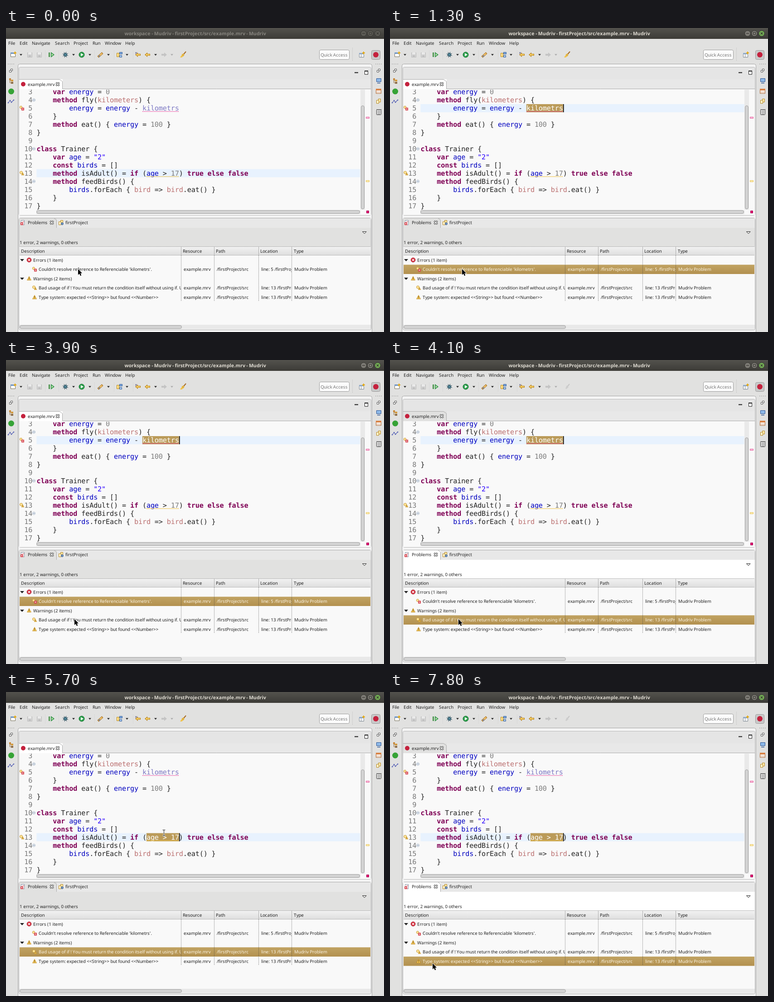
These frames come from a looping animation (834x671 px, 8 s). An HTML page with a canvas:

```html
<!DOCTYPE html>
<html lang="en">
<head>
<meta charset="utf-8">
<title>Code editor</title>
<style>
html, body { margin: 0; width: 100%; height: 100%; overflow: hidden; background: #e1e1e0; }
canvas { display: block; }
</style>
</head>
<body>
<canvas id="stage" width="834" height="671"></canvas>
<script>
const ctx = document.getElementById('stage').getContext('2d');
const LOOP = 8000, STEP = 100;
// Text is set on a whole-pixel desktop grid, shown at this scale
const SCALE = .8165, CHAR = 11 * SCALE, CODE_X = 67.4;
const UI = '12px "Noto Sans", sans-serif';
const TITLE = 'bold 13px "Noto Sans", sans-serif';
const MONO = '18.6px "DejaVu Sans Mono", monospace';
const GOLD = '#bb9b59', INK = '#222', PANEL = '#e1e1e0';
const APP = 'Mudriv', FILE = 'example.mrv';

const code = [
  '    var energy = 0',
  '    method fly(kilometers) {',
  '        energy = energy - kilometrs',
  '    }',
  '    method eat() { energy = 100 }',
  '}',
  '',
  'class Trainer {',
  '    var age = "2"',
  '    const birds = []',
  '    method isAdult() = if (age > 17) true else false',
  '    method feedBirds() {',
  '        birds.forEach { bird => bird.eat() }',
  '    }',
  '}'
];
const syntax = [
  [/^(var|const|method|class|if|true|else|false)$/, '#7f0055', true],
  [/^(energy|age|birds)$/, '#0000c0'],
  [/^(kilometers|bird)$/, '#bb7070'],
  [/^kilometrs$/, '#7d79c4'],
  [/^\d+$/, '#7d7d7d'],
  [/^"/, '#2a00ff']
];
const problems = [
  { y: 532.5, icon: 'error', text: "Couldn't resolve reference to Referenciable 'kilometrs'.", line: 5 },
  { y: 573.5, icon: 'quick', text: 'Bad usage of if ! You must return the condition itself without using if. Use it', line: 13 },
  { y: 594, icon: 'warning', text: 'Type system: expected <<String>> but found <<Number>>', line: 13 }
];
// Pointer path: time, x, y
const path = [
  [0, 159, 532], [1400, 159, 532], [1700, 318, 218], [1800, 318, 218], [2200, 350, 175],
  [2300, 350, 175], [2400, 318, 235.5], [3300, 318, 235.5], [3500, 151, 572], [4300, 151, 572],
  [4400, 153, 570], [4600, 352, 316], [4800, 352, 316], [5000, 318, 306], [5200, 390, 314],
  [5400, 308, 325], [5700, 348.5, 311], [6000, 384, 320], [6200, 310, 322], [6400, 346, 318],
  [6600, 346, 318], [6900, 80, 566], [7100, 80, 566], [7400, 94, 599], [8000, 94, 599]
];

function box(x, y, w, h, fill, stroke, r = 0) {
  const o = stroke ? .5 : 0;
  ctx.beginPath();
  ctx.roundRect(x + o, y + o, w - 2 * o, h - 2 * o, r);
  ctx.lineWidth = 1;
  if (fill) { ctx.fillStyle = fill; ctx.fill(); }
  if (stroke) { ctx.strokeStyle = stroke; ctx.stroke(); }
}
function trace(pts) {
  ctx.beginPath();
  for (let i = 0; i < pts.length; i += 2) ctx.lineTo(pts[i], pts[i + 1]);
}
function line(color, width, ...pts) {
  trace(pts);
  ctx.strokeStyle = color;
  ctx.lineWidth = width;
  ctx.stroke();
}
function poly(fill, ...pts) {
  trace(pts);
  ctx.fillStyle = fill;
  ctx.fill();
}
function disc(x, y, r, fill, stroke) {
  ctx.beginPath();
  ctx.arc(x, y, r, 0, 7);
  ctx.lineWidth = 1;
  if (fill) { ctx.fillStyle = fill; ctx.fill(); }
  if (stroke) { ctx.strokeStyle = stroke; ctx.stroke(); }
}
function dashed(color, width, dash, ...pts) {
  ctx.setLineDash(dash);
  line(color, width, ...pts);
  ctx.setLineDash([]);
}
function fade(y0, y1, top, bottom) {
  const g = ctx.createLinearGradient(0, y0, 0, y1);
  g.addColorStop(0, top);
  g.addColorStop(1, bottom);
  return g;
}

const advances = {};
function advance(char, font) {
  return advances[font + char] ??= Math.round(ctx.measureText(char).width);
}
// align: 0 = left, .5 = centre, 1 = right
function label(text, x, y, { color = INK, right = 834, font = UI, align = 0 } = {}) {
  const chars = [...String(text)];
  ctx.save();
  ctx.beginPath();
  ctx.rect(0, 0, right, 671);
  ctx.clip();
  ctx.translate(x, y + 3.5);
  ctx.scale(SCALE, SCALE);
  ctx.font = font;
  ctx.fillStyle = color;
  let pen = -align * chars.reduce((sum, c) => sum + advance(c, font), 0);
  for (const c of chars) {
    ctx.fillText(c, pen, 0);
    pen += advance(c, font);
  }
  ctx.restore();
}
function cross(x, y, r, color, width = 1.2) {
  line(color, width, x - r, y - r, x + r, y + r);
  line(color, width, x + r, y - r, x - r, y + r);
}
function tabClose(x, y) {
  cross(x, y, 3.4, '#444', 3.6);
  cross(x, y, 3, '#fff', 1.5);
}
const dropDown = (x, y, color = INK) => poly(color, x - 3, y - 1.5, x + 3, y - 1.5, x, y + 2);
const arrow = (x, y, d, fill) => poly(fill, x - 6 * d, y, x, y - 5, x, y - 2, x + 6 * d, y - 2, x + 6 * d, y + 2, x, y + 2, x, y + 5);

const icons = {
  warning(x, y) {
    poly('#c08a1c', x, y - 5, x + 5, y + 4.5, x - 5, y + 4.5);
    poly('#ffd667', x, y - 3, x + 3.6, y + 3.5, x - 3.6, y + 3.5);
    line('#553300', 1.2, x, y - 1.5, x, y + 1.2);
    line('#553300', 1.2, x, y + 2, x, y + 3);
  },
  quick(x, y) {
    disc(x - 1.5, y - 1.5, 3, '#ffe699', '#c79a3c');
    ctx.save();
    ctx.translate(x + 2, y + 1.5);
    ctx.scale(.65, .65);
    icons.warning(0, 0);
    ctx.restore();
  },
  error(x, y) {
    disc(x - 2, y - 2, 2.7, '#ffe699', '#c79a3c');
    box(x - 1, y - 1, 6, 6, '#d43a45');
    cross(x + 2, y + 2, 1.6, '#fff', 1);
  },
  restore(x, y) {
    box(x - 1, y - 4, 5, 5, '#fff', '#555');
    box(x - 4, y - 1, 5, 5, '#fff', '#555');
  },
  docs(x, y) {
    box(x - 1, y - 5, 6, 8, '#ffe9a8', '#b68b2d');
    box(x - 5, y - 2, 6, 8, '#fff3c9', '#b68b2d');
  }
};

function drawTitle(active) {
  box(0, 0, 834, 24, fade(0, 24, '#53524d', '#3c3b37'));
  const color = active ? '#dfdbd2' : '#87857f';
  label(`workspace - ${APP} - firstProject/src/${FILE} - ${APP}`, 417.5, 12, { color, font: TITLE, align: .5 });
  [789, 804, 820].forEach((x, i) => {
    disc(x, 12, 6.3, active ? (i == 2 ? '#74ad56' : '#7d7b75') : '#5c5b55', '#32312d');
    const ink = active ? '#2f2e2a' : '#35342f';
    if (i == 0) line(ink, 1.2, x - 3, 12, x + 3, 12);
    if (i == 1) box(x - 3, 9, 6, 6, null, ink);
    if (i == 2) cross(x, 12, 2.4, ink);
  });
}

function drawToolbar(broomEnabled) {
  'File,5 Edit,30 Navigate,57 Search,108 Project,149 Run,191 Window,218 Help,263'.split(' ').forEach(m => {
    const [name, x] = m.split(',');
    label(name, +x, 33);
  });
  const y = 59;
  box(10, 54, 11, 10, '#fff', '#77725c');
  box(10, 54, 11, 3, '#6d94c5');
  line('#e2a814', 2, 17, 55, 23, 55);
  line('#e2a814', 2, 20, 52, 20, 58);
  for (const x of [52, 73]) {
    box(x - 5, y - 5, 11, 11, '#d6d6d6', '#bdbdbd');
    box(x - 3, y - 5, 7, 4, '#eaeaea');
    box(x - 2, y + 1, 5, 5, '#c2c2c2');
  }
  for (const x of [86, 116, 195, 238, 280]) dashed('#c5c5c5', 1, [1, 2], x + .5, 50, x + .5, 69);
  box(94, 54, 3, 10, '#86bb78', '#33843d');
  poly('#329447', 99, 53, 107, 59, 99, 65);
  poly('#b9e2ac', 100.5, 56, 104.5, 59, 100.5, 62);
  for (let a = 0; a < 8; a++)
    line('#2e5060', 1, 131, y, 131 + 6.5 * Math.cos(a * .785 + .3), y + 6.5 * Math.sin(a * .785 + .3));
  disc(131, y, 3.6, '#4f8295', '#254450');
  disc(167, y, 6, '#2c9f4b', '#167031');
  poly('#fff', 165, 55.5, 171, 59, 165, 62.5);
  line('#ae7623', 4.5, 203, 64, 213, 55);
  line('#f4c773', 2.5, 204, 63, 212, 56);
  disc(206, 62, 2, '#7b8296');
  box(244, 55, 6, 9, '#ffe088', '#b78b25');
  box(250, 53, 7, 5, '#7da4d8', '#3c68a2');
  box(250, 60, 6, 5, '#a9c5e8', '#3c68a2');
  for (const x of [291, 312]) {
    arrow(x, y, 1, '#b47c13');
    poly('#ffda70', x - 4, y, x - 1, y - 3, x - 1, y - 1, x + 5, y - 1, x + 5, y + 1, x - 1, y + 1, x - 1, y + 3);
  }
  cross(287, 55, 2, '#5b5b88', 1);
  arrow(349, y, -1, '#c4c4c4');
  [33, 149, 185, 226, 267, 330].forEach(x => dropDown(x, y));
  dropDown(366, y, '#aaa');
  if (broomEnabled) {
    line('#a66a23', 2, 391, 59, 397, 52);
    poly('#efc24c', 390, 56, 394, 60, 388, 65, 384, 65);
    line('#b58a28', 1, 388, 58, 392, 62);
  } else {
    line('#c6c6c6', 2, 391, 59, 396, 53);
    poly('#cdcdcd', 390, 56, 394, 60, 389, 64, 387, 63);
  }
  box(691, 48, 67, 22, '#fbfbfb', '#9c9c9c', 3);
  label('Quick Access', 694, y, { color: '#777' });
  dashed('#aaa', 1, [1, 2], 764.5, 44, 764.5, 74);
  box(779, 55, 11, 10, '#fff', '#78838e');
  box(779, 55, 11, 3, '#91aac8');
  line('#78838e', 1, 783.5, 58, 783.5, 64);
  line('#e2a814', 2, 786, 55, 792, 55);
  line('#e2a814', 2, 789, 52, 789, 58);
  box(806, 49, 20, 21, '#c9c9c9', '#999', 3);
  disc(816, y, 6, '#c4213d');
}

function drawSidebars() {
  for (const x of [4, 815]) dashed('#999', 1, [2, 2], x, 79.5, x + 15, 79.5);
  icons.restore(11, 94);
  icons.restore(822, 94);
  line('#9b7745', 1, 8.5, 112, 8.5, 121, 12, 121);
  line('#9b7745', 1, 8.5, 116.5, 12, 116.5);
  box(7, 111, 4, 4, '#c88636');
  box(11, 114, 5, 4, '#d29a3f');
  box(11, 119, 5, 4, '#8b6b45');
  disc(11.5, 140, 6.5, '#36a336');
  line('#5560b5', 1.2, 5, 165, 9, 160, 12, 164, 17, 159);
  for (const [x, y] of [[5, 165], [9, 160], [12, 164], [17, 159]]) disc(x, y, 1.3, '#5560b5');
  box(817, 111, 11, 8, '#8eb9e9', '#2e5796');
  line('#2e5796', 1.5, 819, 121.5, 826, 121.5);
  box(816, 134, 12, 11, '#fff', '#a65c24');
  box(816, 134, 12, 4, '#d98448');
  line('#c98655', 1, 816, 141.5, 828, 141.5);
  icons.docs(822, 161);
  box(817, 180, 11, 12, '#fff', '#333', 1);
  for (const y of [183.5, 186.5, 189.5]) line('#444', 1, 819, y, 826, y);
  dashed('#333', 2, [1, 2], 818, 180, 828, 180);
}

const lineY = n => 141 + (n - 3) * 17.95;
const colX = c => CODE_X + c * CHAR;

function wave(color, c0, c1, y) {
  dashed(color, 1.3, [2, 1], colX(c0), y, colX(c1), y);
}

function drawEditor({ current, selection, caret }, focused) {
  box(26, 79, 782, 600, '#f4f4f4', '#a5a5a5', 4);
  box(28, 86, 778, 328, '#e5e5e5', '#b9b9b9', 3);
  line(INK, 2, 769, 98.5, 777, 98.5);
  box(791, 94, 8, 9, '#fff', INK);
  line(INK, 2, 791, 95, 799, 95);
  box(29, 113, 776, 300, '#f9f9f9');
  box(29, 113, 96, 22, focused ? '#fff' : PANEL);
  box(125, 113, 680, 21, '#e8e8e8');
  line('#ababab', 1, 29, 113.5, 118, 113.5, 124.5, 118, 124.5, 134.5, 805, 134.5);
  disc(38, 124, 5, '#c4213d');
  label(FILE, 48, 124);
  tabClose(114, 124);

  ctx.save();
  ctx.beginPath();
  ctx.rect(29, 136, 754, 266);
  ctx.clip();
  box(CODE_X, lineY(current) - 9, 714, 18, '#e8f2fe');
  if (selection) box(colX(selection[0]), lineY(current) - 9, (selection[1] - selection[0]) * CHAR, 18, GOLD);
  code.forEach((src, i) => {
    const n = i + 3, y = lineY(n) + 1.7;
    label(n, 58.3, y, { color: '#787878', font: MONO, align: 1 });
    for (const m of src.matchAll(/"[^"]*"|\w+|[^\s\w"]+/g)) {
      const [, color = INK, bold] = syntax.find(([re]) => re.test(m[0])) || [];
      const picked = selection && n == current && m.index >= selection[0] && m.index < selection[1];
      label(m[0], colX(m.index), y, { color: picked ? '#fff' : color, font: (bold ? 'bold ' : '') + MONO });
    }
  });
  for (const n of [4, 10, 14]) {
    disc(61.5, lineY(n), 3, '#f3f6fa', '#a9b7c8');
    line('#7b8fa8', 1, 59.5, lineY(n), 63.5, lineY(n));
  }
  wave('#e6419b', 26, 35, lineY(5) + 7.5);
  wave('#efc13f', 27, 35, lineY(13) + 7.5);
  icons.error(35, lineY(5));
  icons.quick(35, lineY(13));
  if (caret) box(Math.round(colX(caret)), lineY(current) - 9, 1.6, 18, '#000');
  ctx.restore();

  box(782, 136, 10, 265, '#e9e9e9');
  box(783, 171, 8, 229, '#d3d3d3', '#a2a2a2', 4);
  box(67, 402, 715, 9, '#e9e9e9');
  box(67, 402, 714, 8, '#d3d3d3', '#a2a2a2', 4);
  box(794, 196, 8, 4, '#ffc5df', '#e2629e');
  box(794, 336, 8, 4, '#fff0bd', '#e8c458');
  box(795, 403, 6, 6, '#e30b72', '#a20a55');
}

function drawProblems(selected, focused) {
  const panel = focused ? '#fff' : PANEL;
  box(28, 419, 778, 248, '#f9f9f9', '#a9a9a9', 3);
  box(29, 420, 83, 22, panel);
  box(29, 441, 776, 42, panel);
  box(112, 420, 693, 21, '#e8e8e8');
  line('#ababab', 1, 106, 419.5, 111.5, 424, 111.5, 441);
  box(33, 424, 8, 11, '#fff', '#8793a5');
  box(32, 429, 6, 6, '#d43a45');
  cross(35, 432, 1.6, '#fff', 1);
  line('#c85b62', 1, 36, 427.5, 40, 427.5);
  label('Problems', 48, 429.5);
  tabClose(101, 429.5);
  icons.docs(121, 429);
  disc(124, 432, 2.5, '#7295c5', '#456991');
  label('firstProject', 131, 429.5);
  const menu = [786.5, 449.5, 795, 449.5, 790.8, 454, 786.5, 449.5];
  poly('#fff', ...menu);
  line(INK, 1, ...menu);
  label('1 error, 2 warnings, 0 others', 30, 473);

  box(30, 482, 774, 20, fade(482, 502, '#f2f2f2', '#dedede'));
  line('#bababa', 1, 30, 482.5, 804, 482.5);
  line('#bababa', 1, 30, 501.5, 804, 501.5);
  const edges = [386.5, 459.5, 557.5, 630.5];
  edges.forEach(x => line('#b0b0b0', 1, x, 483, x, 501));
  ['Description', 'Resource', 'Path', 'Location', 'Type'].forEach((s, i) => label(s, [33, 390, 463, 561, 635][i], 492));

  for (const y of [512, 553]) poly(INK, 31, y - 2, 40, y - 2, 35.5, y + 3);
  disc(51, 512, 4.8, '#d93443', '#a91b2c');
  cross(51, 512, 2, '#fff', 1.4);
  label('Errors (1 item)', 60, 512);
  icons.warning(51, 552.5);
  label('Warnings (2 items)', 60, 553);
  problems.forEach((p, i) => {
    const on = i == selected, color = on ? '#fbf5e6' : INK;
    if (on) box(30, p.y - 10, 774, 20.4, fade(p.y - 10, p.y + 10, '#c1a362', '#b39150'));
    icons[p.icon](63, p.y);
    label(p.text, 72, p.y, { color, right: 386 });
    label(FILE, 392, p.y, { color, right: 459 });
    label('/firstProject/src', 465, p.y, { color, right: 557 });
    label(`line: ${p.line} /firstProject/src`, 563, p.y, { color, right: 630 });
    label(`${APP} Problem`, 636, p.y, { color });
  });
  edges.forEach(x => dashed('#333', 1, [1, 2], x, 502, x, 604));
  box(29, 655, 776, 10, '#e9e9e9');
  box(30, 656, 358, 8, '#d3d3d3', '#a2a2a2', 4);
}

function drawPointer(t) {
  const i = Math.max(1, path.findIndex(p => p[0] >= t));
  const [t0, x0, y0] = path[i - 1], [t1, x1, y1] = path[i];
  const k = (t - t0) / (t1 - t0), x = x0 + (x1 - x0) * k, y = y0 + (y1 - y0) * k;
  ctx.save();
  ctx.translate(x, y);
  if (x > CODE_X && y > 136 && y < 402) {
    for (const [color, w] of [['#fff', 2.6], ['#333', 1.1]]) {
      line(color, w, 0, -6, 0, 6);
      line(color, w, -3, -6.5, 3, -6.5);
      line(color, w, -3, 6.5, 3, 6.5);
    }
  } else {
    const shape = [0, 0, 0, 13, 3, 10.3, 5, 15, 7.3, 14, 5.3, 9.5, 9, 9.3, 0, 0];
    line('#fff', 1.6, ...shape);
    poly('#000', ...shape);
  }
  ctx.restore();
}

function editorState(t) {
  const blinkOn = Math.floor((t - 4400) / 500) % 2 == 0 || t >= 7800;
  if (t < 1300) return { current: 13, caret: t >= 800 && 16 };
  if (t < 4400) return { current: 5, selection: [26, 35], caret: (t < 1900 || t >= 3900) && 35 };
  return { current: 13, selection: [27, 35], caret: blinkOn && 35 };
}

function draw(t) {
  ctx.textRendering = 'geometricPrecision';
  box(0, 0, 834, 671, PANEL);
  const tableFocused = (t >= 900 && t < 1300) || (t >= 4100 && t < 4400) || t >= 7800;
  const selected = t < 900 ? -1 : t < 4100 ? 0 : t < 7800 ? 1 : 2;
  drawTitle(t >= 800);
  drawToolbar(!tableFocused);
  drawSidebars();
  drawEditor(editorState(t), !tableFocused);
  drawProblems(selected, tableFocused);
  drawPointer(t);
}

const start = performance.now();
function tick() {
  const t = (performance.now() - start) % LOOP;
  draw(Math.floor(t / STEP) * STEP);
  requestAnimationFrame(tick);
}
tick();
</script>
</body>
</html>
```
